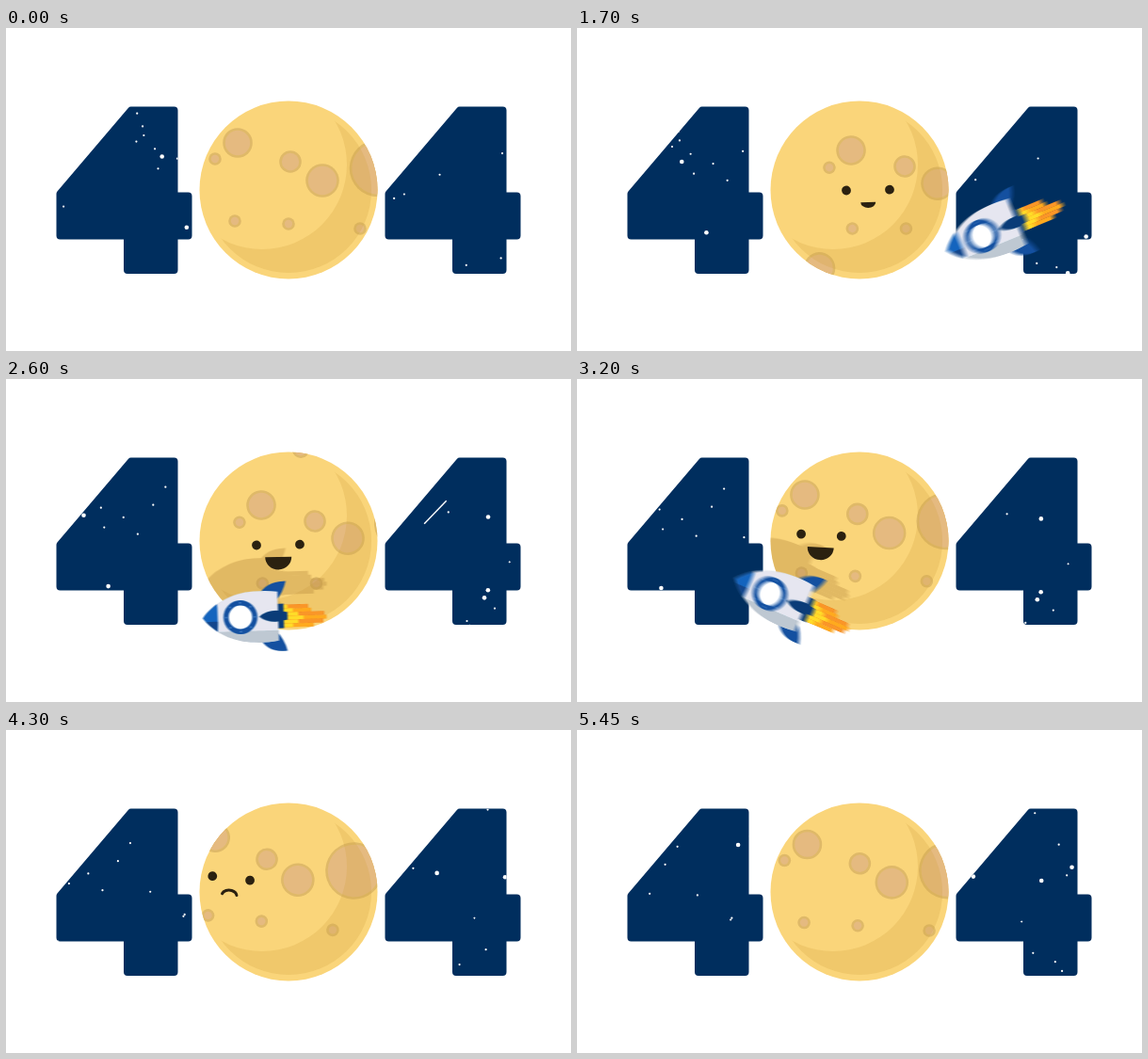
An HTML page with a canvas for the animation above (5.5 s loop, 600 by 343 pixels).

```html
<!DOCTYPE html>
<html lang="en">
<head>
<meta charset="utf-8">
<title>404</title>
<style>
html, body { margin: 0; width: 100%; height: 100%; overflow: hidden; background: #fff; }
canvas { display: block; }
</style>
</head>
<body>
<canvas id="stage" width="600" height="343"></canvas>
<script>
const W = 600, H = 343, LOOP = 5500, STEP = 50;
const TAU = Math.PI * 2, RAD = Math.PI / 180;
const ctx = document.getElementById('stage').getContext('2d');
const layer = () => Object.assign(document.createElement('canvas'), { width: W, height: H }).getContext('2d');
const single = layer(), blurred = layer(), shade = layer();

// ---- timing helpers ----
const clamp = u => Math.min(1, Math.max(0, u));
function ramp(t, from, to) {
  const u = clamp((t - from) / (to - from));
  return u * u * (3 - 2 * u);
}
// smooth curve through rows of [time, ...values]; a period makes it cyclic
function curve(keys, t, period) {
  const n = keys.length;
  const row = i => {
    if (!period) return keys[Math.min(n - 1, Math.max(0, i))];
    const [time, ...rest] = keys[(i + n) % n];
    return [time + Math.floor(i / n) * period, ...rest];
  };
  let i = 0;
  while (i < (period ? n - 1 : n - 2) && t >= keys[i + 1][0]) i++;
  const [p, a, b, q] = [-1, 0, 1, 2].map(k => row(i + k));
  const d = b[0] - a[0], u = clamp((t - a[0]) / d), u2 = u * u, u3 = u2 * u;
  return a.slice(1).map((v, j) => {
    const k = j + 1;
    const m0 = (b[k] - p[k]) / (b[0] - p[0]) * d;
    const m1 = (q[k] - a[k]) / (q[0] - a[0]) * d;
    return (2 * u3 - 3 * u2 + 1) * v + (u3 - 2 * u2 + u) * m0 + (3 * u2 - 2 * u3) * b[k] + (u3 - u2) * m1;
  });
}
function seeded(seed) {
  return () => (seed = seed * 16807 % 2147483647) / 2147483647;
}

function dot(c, x, y, r, color) {
  c.fillStyle = color;
  c.beginPath();
  c.arc(x, y, r, 0, TAU);
  c.fill();
}
function fill(c, color, path) {
  c.fillStyle = color;
  c.fill(new Path2D(path));
}

// ---- digits: outer corners are rounded, inner ones stay sharp ----
const FOUR = [[131, 83.5], [182.5, 83.5], [182.5, 174.5], [197.5, 174.5], [197.5, 224.5],
  [182.5, 224.5], [182.5, 261], [125, 261], [125, 224.5], [53.5, 224.5], [53.5, 174.5]];

function fourPath(dx) {
  const n = FOUR.length;
  ctx.moveTo(157 + dx, FOUR[0][1]);
  for (let i = 1; i <= n; i++) {
    const [p, c, q] = [i - 1, i, i + 1].map(k => FOUR[k % n]);
    const turn = (c[0] - p[0]) * (q[1] - c[1]) - (c[1] - p[1]) * (q[0] - c[0]);
    ctx.arcTo(c[0] + dx, c[1], q[0] + dx, q[1], turn > 0 ? 4 : 0);
  }
  ctx.closePath();
}
function digits() {
  ctx.beginPath();
  fourPath(0);
  fourPath(349);
}

// ---- sky: two drifting layers of stars ----
const rnd = seeded(404);
const scatter = (count, right) => Array.from({ length: count },
  () => ({ x: 50 + rnd() * (right - 50), y: 70 + rnd() * 188 }));
const LAYERS = [
  { speed: 22, r: 1.1, stars: scatter(44, 668) },
  { speed: 32, r: 2.3, stars: scatter(14, 723) }
];

function sparkle(x, y, r) {
  ctx.fillStyle = '#fff';
  ctx.beginPath();
  ctx.moveTo(x, y - r);
  for (let i = 0; i < 4; i++) {
    const a = i * TAU / 4, b = a - TAU / 8;
    ctx.quadraticCurveTo(x + Math.cos(b) * r * 0.12, y + Math.sin(b) * r * 0.12,
      x + Math.cos(a) * r, y + Math.sin(a) * r);
  }
  ctx.fill();
}
function sky(t) {
  const s = t / 1000, sink = s * 3.2;
  for (const { speed, r, stars } of LAYERS) {
    stars.forEach(p => dot(ctx, p.x - s * speed, p.y + sink, r, '#fff'));
  }
  const glow = clamp(1 - Math.abs(t - 3650) / 300);
  sparkle(592 - s * 22, 186 + sink, 1.5 + 6 * glow);

  const u = (t - 2450) / 350 * 1.5, head = Math.min(1, u), tail = Math.max(0, u - 0.31);
  if (u > 0 && tail < 1) {
    ctx.strokeStyle = '#fff';
    ctx.lineWidth = 1.4;
    ctx.beginPath();
    for (const v of [head, tail]) ctx.lineTo(493 - 76 * v, 103 + 79 * v);
    ctx.stroke();
  }
}
function trail(t) {
  if (t < 3350 || t > 4000) return;
  const tail = Math.min(195, 162 - (t - 3650) * 0.33);
  const head = Math.max(45, curve(FLIGHT, t)[0] + 40);
  if (head > tail) return;
  ctx.beginPath();
  for (let x = tail; x >= head; x -= 3) {
    const u = 162 - x;
    ctx.lineTo(x, 215 - 0.347 * u - 0.00115 * u * u);
  }
  ctx.strokeStyle = 'rgba(210,184,115,.75)';
  ctx.lineWidth = 5;
  ctx.lineCap = 'round';
  ctx.stroke();
}

// ---- moon ----
// time, then x, y and angle of the crater field
const SPIN = [[0, 302, 142, 0], [950, 331, 145, -3], [1700, 348, 147, -3],
  [2600, 328, 151, -3], [3650, 280, 138, 2.6], [4950, 284, 139, 2.6]];
// offset from the middle crater, radius
const CRATERS = [[0, 0, 11], [-56, -20, 15], [34, 20, 17], [93, 7, 29.5], [-96, 103, 16],
  [-80, -3, 6], [-59, 63, 6], [-2, 66, 6], [74, 71, 6], [-11, -77, 8.5]];

function moon(t) {
  const [cx, cy, angle] = curve(SPIN, t, LOOP);
  ctx.save();
  ctx.beginPath();
  ctx.arc(300, 172, 94.5, 0, TAU);
  ctx.clip();
  ctx.fillStyle = '#fad57a';
  ctx.fillRect(200, 70, 200, 200);

  ctx.save();
  ctx.translate(cx, cy);
  ctx.rotate(angle * RAD);
  for (const [x, y, r] of CRATERS) {
    dot(ctx, x, y, r + 0.8, '#dfb968');
    dot(ctx, x, y, r - 1.8, '#e5ba80');
  }
  ctx.restore();

  // crescent: rim disc minus the lit disc
  ctx.save();
  ctx.beginPath();
  ctx.rect(200, 70, 200, 200);
  ctx.arc(272, 145, 90, 0, TAU);
  ctx.clip('evenodd');
  dot(ctx, 300, 172, 88, 'rgba(205,160,60,.25)');
  ctx.restore();

  if (flying(t)) {
    ctx.globalAlpha = 0.38;
    ctx.drawImage(shade.canvas, 0, -35);
    ctx.globalAlpha = 1;
  }
  face(t, cx, cy, (angle + 3) / 5.6);
  ctx.restore();
}
function face(t, cx, cy, turn) {
  if (t <= 900 || t >= 5100) return;
  const eye = ramp(t, 950, 1150) * (1 - ramp(t, 4800, 5100));
  const grin = ramp(t, 2300, 2500) - ramp(t, 3900, 4150);
  const w = 8 + 6 * grin;
  const h = 6 * ramp(t, 850, 1400) + 7.5 * grin - 12 * ramp(t, 3950, 4300);
  const gap = 23 - 2.7 * turn;
  ctx.save();
  ctx.translate(cx - 39 + turn, cy + 25.5 - 4.5 * turn);
  ctx.rotate((-1 + 6.7 * turn) * RAD);
  ctx.fillStyle = ctx.strokeStyle = '#2b2110';
  for (const side of [-1, 1]) {
    ctx.beginPath();
    ctx.ellipse(side * gap, -0.4, 4.9, 4.9 * eye, 0, 0, TAU);
    if (eye) ctx.fill();
  }
  ctx.beginPath();
  if (h >= 0) {
    ctx.ellipse(0, 12.5, w, h, 0, 0, Math.PI);
    ctx.fill();
  } else {
    ctx.lineWidth = 3;
    ctx.lineCap = 'round';
    ctx.ellipse(0, 13 - h * 0.9, w, -h, 0, Math.PI * 1.08, Math.PI * 1.92);
    ctx.stroke();
  }
  ctx.restore();
}

// ---- rocket: nose to the left, window at the origin, heading along its path ----
const FLIGHT = [[1450, 640, 95], [1700, 430, 221], [2600, 249, 253], [3200, 205, 228], [3600, -50, 125]];
const flying = t => t >= 1450 && t < 3600;

function heading(t) {
  const [x0, y0] = curve(FLIGHT, t - 5), [x1, y1] = curve(FLIGHT, t + 5);
  return Math.atan2(y0 - y1, x0 - x1);
}
function flame(c, t) {
  for (let i = 0; i < 6; i++) {
    const y = i * 4 - 12, reach = 49 - 2 * Math.abs(y) + 3 * Math.sin(t / STEP * 2.1 + i * 2.7);
    c.fillStyle = i % 2 ? '#f9a01b' : '#f58a1f';
    c.fillRect(45, y, reach, 4.2);
    c.fillStyle = '#fdcf22';
    c.fillRect(45, y, 22 - 1.4 * Math.abs(y), 4.2);
  }
}
function rocket(c, t) {
  flame(c, t);
  fill(c, '#063a75', 'M39-13H46V13H39Z');
  fill(c, '#0b4c9c', 'M20-22Q27-37 49-37Q46-25 38-16ZM20 22Q27 39 49 37Q46 25 38 16Z');
  const hull = 'M-40 0C-29-15-9-26 14-27Q28-28 40-26V26Q28 28 14 27C-9 26-29 15-40 0Z';
  c.save();
  c.clip(new Path2D(hull));
  fill(c, '#d9e0e7', 'M-42-30H42V30H-42Z');
  fill(c, '#b4bfca', 'M-42 15H42V30H-42Z');
  fill(c, '#0f5bb3', 'M-42-30H-26Q-22 0-26 30H-42Z');
  fill(c, '#0a4488', 'M-42 4H-24L-26 30H-42Z');
  c.restore();
  dot(c, 0, 0, 18, '#0b4c9c');
  for (let a = 0; a < TAU; a += TAU / 8) dot(c, Math.cos(a) * 15.3, Math.sin(a) * 15.3, 0.9, '#4f86c6');
  dot(c, 0, 0, 12.5, '#f7f9fb');
  fill(c, '#063a75', 'M20 0Q27-6 38-6L50-4V4L38 6Q27 6 20 0Z');
}
// averages several moments for motion blur, then tints a copy for the shadow
function renderRocket(t) {
  const copies = 10, shutter = 18;
  blurred.clearRect(0, 0, W, H);
  blurred.globalCompositeOperation = 'lighter';
  blurred.globalAlpha = 1 / copies;
  for (let i = 0; i < copies; i++) {
    const moment = t + (i / (copies - 1) - 0.5) * shutter;
    single.clearRect(0, 0, W, H);
    single.save();
    single.translate(...curve(FLIGHT, moment));
    single.rotate(heading(t));
    rocket(single, t);
    single.restore();
    blurred.drawImage(single.canvas, 0, 0);
  }
  shade.globalCompositeOperation = 'copy';
  shade.drawImage(blurred.canvas, 0, 0);
  shade.globalCompositeOperation = 'source-in';
  shade.fillStyle = '#b88c40';
  shade.fillRect(0, 0, W, H);
}

function draw(t) {
  ctx.fillStyle = '#fff';
  ctx.fillRect(0, 0, W, H);
  if (flying(t)) renderRocket(t);

  ctx.save();
  digits();
  ctx.fillStyle = '#002e5e';
  ctx.fill();
  ctx.clip();
  sky(t);
  trail(t);
  ctx.restore();

  moon(t);

  if (flying(t)) {
    ctx.save();
    digits();
    ctx.rect(125, 0, 406, H);
    ctx.clip();
    ctx.drawImage(blurred.canvas, 0, 0);
    ctx.restore();
  }
}
function tick() {
  draw(Math.floor(performance.now() % LOOP / STEP) * STEP);
  requestAnimationFrame(tick);
}
tick();
</script>
</body>
</html>
```
